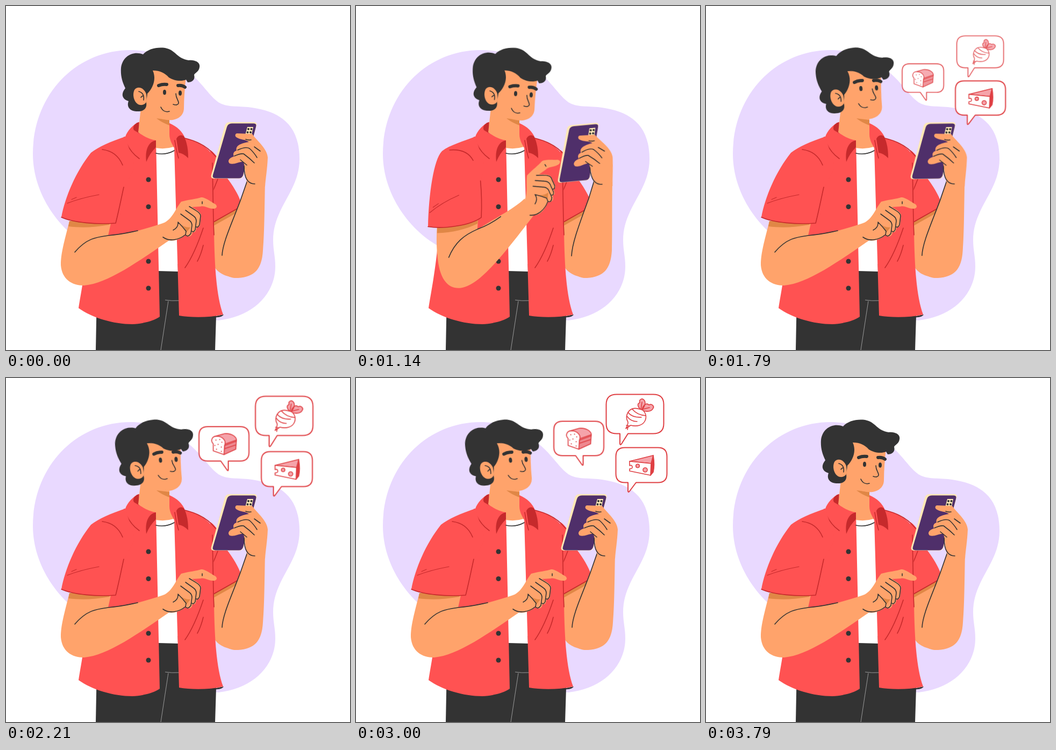
An HTML page without scripts that plays this animation: 640x640 px, repeating every 3.87 s.

```html
<!DOCTYPE html>
<html lang="en">
<head>
<meta charset="utf-8">
<title>Ordering groceries by phone</title>
<style>
html, body { margin: 0; width: 100%; height: 100%; overflow: hidden; background: #fff; }
svg { display: block; width: 100%; height: 100%; }
svg * { animation-duration: 3.87s; animation-iteration-count: infinite; animation-timing-function: ease-in-out; }

.skin { fill: #ffa36b; }
.shade { fill: #e08746; }
.shirt { fill: #ff5252; }
.fold { fill: #c62a2c; }
.dark { fill: #333; }
.ink, .seam { fill: none; stroke-width: 1.6; stroke-linecap: round; stroke-linejoin: round; }
.ink { stroke: #333; }
.seam { stroke: #c62a2c; }
.brow { fill: none; stroke: #333; stroke-width: 6; stroke-linecap: round; }

/* Limbs blend between a resting outline and a raised one */
.reach { d: var(--rest); animation-name: reach; }
@keyframes reach {
  0%, 11.11%, 42.38%, 100% { d: var(--rest); }
  18.35%, 27.65% { d: var(--up); }
}
.lean { d: var(--rest); animation-name: lean; }
@keyframes lean {
  0%, 11.11%, 50.39%, 100% { d: var(--rest); }
  18.35%, 35.5% { d: var(--up); }
}
.tap { transform-origin: 292px 430px; animation-name: tap; }
@keyframes tap {
  0%, 11.11%, 42.38%, 100% { transform: translate(0, 0) rotate(0deg); }
  18.35%, 27.65% { transform: translate(33px, -43px) rotate(-32.5deg); }
  27.65% { animation-timing-function: ease-in; }
  38.76% { transform: translate(8px, -2px) rotate(-13.7deg); animation-timing-function: ease-out; }
}
.tilt { transform-origin: 468px 385px; animation-name: tilt; }
@keyframes tilt {
  0%, 11.11%, 50.39%, 100% { transform: rotate(0deg); }
  18.35%, 35.5% { transform: rotate(-5.3deg); }
}
.head { transform-origin: 282px 227px; animation-name: head; }
@keyframes head {
  0%, 11.11%, 98%, 100% { transform: rotate(0deg); }
  18.35%, 25% { transform: rotate(3deg); }
  25% { animation-timing-function: ease-in; }
  38.76% { transform: rotate(-2.6deg); animation-timing-function: ease-out; }
  50.4%, 91.2% { transform: rotate(-5.9deg); }
}
.face { animation-name: face; }
@keyframes face {
  0%, 11.11%, 98%, 100% { transform: translateY(0); }
  18.35%, 25% { transform: translateY(3.5px); }
  25% { animation-timing-function: ease-in; }
  38.76% { transform: translateY(-3px); animation-timing-function: ease-out; }
  50.4%, 91.2% { transform: translateY(-6.7px); }
}

.bubble { stroke: #df3f43; stroke-width: 2; stroke-linejoin: round; fill: #fff; opacity: 0; }
.bubble g { stroke-width: 1.6; stroke-linecap: round; }
.pink { fill: #f5a3aa; }
.rose { fill: #ee8990; }
.red { fill: #df3f43; }
.line { fill: none; }

.cheese { animation-name: cheese; }
@keyframes cheese {
  0%, 33.3% { transform: translate(462px, 190px) scale(.05); opacity: 0; animation-timing-function: linear; }
  38.76% { transform: translate(494px, 173.5px) scale(.955); opacity: 1; animation-timing-function: ease-out; }
  57.11% { transform: translate(522.5px, 169.5px) scale(1); animation-timing-function: ease-out; }
  68.22% { transform: translate(532px, 163px) scale(1); }
  77.52% { transform: translate(531px, 162px) scale(1); animation-timing-function: ease-in; }
  90.44% { transform: translate(513px, 136.5px) scale(.89); opacity: 1; animation-timing-function: linear; }
  97.67%, 100% { transform: translate(516px, 100px) scale(.75); opacity: 0; }
}
.bread { animation-name: bread; }
@keyframes bread {
  0%, 36.9% { transform: translate(402px, 175px) scale(.02); opacity: 0; animation-timing-function: linear; }
  38.76% { transform: translate(402px, 169.5px) scale(.16); opacity: .55; animation-timing-function: ease-out; }
  51% { transform: translate(404px, 125px) scale(1); opacity: 1; }
  57.11% { transform: translate(405.5px, 122.5px) scale(1); animation-timing-function: ease-out; }
  70% { transform: translate(414px, 113px) scale(1); }
  77.52% { transform: translate(414.5px, 112.5px) scale(1); opacity: 1; animation-timing-function: ease-in; }
  90.44% { transform: translate(417px, 59.5px) scale(.975); opacity: .78; animation-timing-function: linear; }
  95.9%, 100% { transform: translate(420px, 30px) scale(.9); opacity: 0; }
}
.beet { animation-name: beet; }
@keyframes beet {
  0%, 37% { transform: translate(481px, 150px) scale(.03); opacity: 0; animation-timing-function: linear; }
  38.76% { transform: translate(483px, 142px) scale(.08); opacity: .45; animation-timing-function: ease-out; }
  51% { transform: translate(517px, 71px) scale(1); opacity: 1; }
  57.11% { transform: translate(517.5px, 70.5px) scale(1); animation-timing-function: ease-out; }
  70% { transform: translate(519px, 67px) scale(1); }
  77.52% { transform: translate(519px, 67px) scale(1); opacity: 1; animation-timing-function: ease-in; }
  90.44% { transform: translate(515.5px, 5px) scale(.92); opacity: .4; animation-timing-function: linear; }
  93.5%, 100% { transform: translate(515px, -18px) scale(.88); opacity: 0; }
}
.spark { opacity: 0; animation-name: spark; animation-timing-function: step-end; }
@keyframes spark {
  0%, 40.5% { opacity: 0; }
  38.5% { opacity: 1; }
}
</style>
</head>
<body>
<svg viewBox="0 0 640 640">
  <path fill="#e9d9ff" d="M232 82C130 82 50 165 50 275C50 350 100 420 160 450L300 570L395 585C460 578 501 535 501 485C501 465 497 455 497 435C497 375 546 345 546 285C546 220 510 195 450 188C425 186 410 188 395 179C370 160 360 130 310 102C285 88 260 82 232 82Z"/>

  <!-- Trousers and T-shirt -->
  <path class="dark" d="M168.500 560L167 640H389L391.500 560L322 480H280Z"/>
  <path fill="none" stroke="#999" d="M296 547Q308 549 322 548M302 549L288 640"/>
  <path fill="#fff" d="M277 255H313L320 494L283 493Z"/>

  <!-- Arm with the phone -->
  <path class="skin" d="M384 398L432 370L445 380L440 500C420 511 390 498 386 480Z"/>
  <path class="shade" d="M386 398L432 372L427 386L386 409Z"/>
  <path class="shirt" d="M380 268C392 276 400 290 409 317C423 335 431 349 437 364L442 366L430 377L386 402Z"/>
  <path class="seam" d="M432 376L386 402M394 322L386 342"/>
  <path class="skin lean" style="--rest:path('M449 322L436 362C420 405 404 440 400 470C398 508 425 506 432 506C462 504 476 490 478 455C481 420 481 370 482 328Z');--up:path('M444 320L433 358C418 400 403 440 399 470C398 508 425 506 430 506C460 504 474 490 476 455C477 420 476 370 477 328Z')"/>
  <path class="ink lean" style="--rest:path('M449 325L436 362C420 405 403 440 402 464');--up:path('M444 322L433 358C417 402 402 440 401 465')"/>

  <!-- Open shirt -->
  <path class="shirt" d="M248 216C236 220 226 232 222 243C200 252 178 260 165 271L153 430C150 480 140 530 135 562C160 580 200 592 235 592C255 591 275 586 286 578L279 250Z"/>
  <path class="dark" d="M385 578L405 574Q402 580 388 579Z"/>
  <path class="shirt" d="M304 218C318 224 329 234 333 246C358 252 376 263 386 280L387 420C388 480 391 540 404 574C378 580 345 580 322 576L313 264C306 256 303 246 303 238Z"/>
  <path class="seam" d="M333 246C358 252 378 264 390 280M384 292L386 405L387 426M367 413C358 440 345 470 333 487M367 445Q363 462 356 475"/>
  <g class="dark">
    <circle cx="265" cy="323" r="4.5"/><circle cx="265" cy="373.500" r="4.500"/>
    <circle cx="265" cy="424" r="4.500"/><circle cx="265" cy="475" r="4.500"/><circle cx="265" cy="525" r="4.500"/>
  </g>
  <path class="fold" d="M247 216C238 219 235 226 238 231L248 237Z"/>
  <path class="skin" d="M252 180L246 235Q262 247 279 250L278 264Q296 267 312 262Q304 250 304 238V195Z"/>
  <path class="shade" d="M280 209L304 212V222Q290 217 280 209Z"/>
  <path class="ink" d="M279 274Q297 278 313 269"/>
  <path class="fold" d="M279 250C266 252 258 266 261 290Q268 273 279 263ZM317 247C321 239 329 239 332 244C338 258 339 270 339 283Q330 274 321 273Z"/>
  <path class="seam" d="M220 244Q228 270 248 284M314 250Q317 270 321 283"/>

  <g class="head">
    <path class="skin" d="M262 110L335 130C333 150 331 170 331 190C331 206 316 214 300 212C282 209 262 203 252 188L250 150Z"/>
    <g class="face">
      <path class="brow" d="M284 148Q291 145 299 146M320 148Q328 147 333 151"/>
      <ellipse class="dark" cx="295" cy="160.500" rx="3" ry="4.700"/>
      <ellipse class="dark" cx="324" cy="162" rx="3" ry="4.700"/>
      <path class="ink" d="M316 163C316 173 322 176 321 181C320 184 316 185 311 183M288 188C291 195 297 198 304 196"/>
    </g>
    <path class="dark" d="M255 90C264 80 280 76 296 78C316 82 318 98 340 101C352 100 362 105 360 114C359 122 352 124 350 128C352 136 348 142 338 142L335 137C326 141 312 139 303 133C295 124 286 120 273 120C280 135 274 152 263 163L261 180C263 192 254 197 242 196C230 195 224 187 228 177C216 173 213 164 222 153C216 140 213 130 214 115C217 92 238 83 255 90Z"/>
    <path class="skin" d="M261 164C257 152 245 148 239 156C234 166 239 182 249 184C256 185 261 181 262 176Z"/>
    <path class="ink" d="M247 159Q258 162 256 175M251 170Q253 167 256 167"/>
  </g>

  <!-- Tapping arm -->
  <path class="skin reach" style="--rest:path('M118 400C108 440 102 460 102 482C104 508 122 520 145 520C190 516 245 476 308 433L298 402C260 415 225 425 190 427L196 400Z');--up:path('M152 408C150 440 152 460 155 480C160 508 172 525 192 525C225 524 262 480 332 387L314 357C290 380 255 395 227 416L228 396Z')"/>
  <path class="shade reach" style="--rest:path('M118 400L116 410C140 413 165 412 192 407L196 400Z');--up:path('M152 410L152 423C180 422 205 416 227 405L228 396Z')"/>
  <g class="tap">
    <path class="skin" d="M293 404C310 396 314 379 326 364C340 360 355 359 363 356C369 355 378 362 390 369C395 374 390 378 384 377C376 377 370 371 362 373L346 374C356 380 363 384 363 390L361 408C359 413 355 411 354 414C353 422 350 421 347 421C346 430 338 431 334 426C326 433 312 439 302 436L292 430Z"/>
    <path class="shade" d="M319 402Q330 412 343 412L336 421Q330 409 319 402Z"/>
    <path class="ink" d="M341 373C352 380 362 384 362 391L360 407Q357 413 354 411M334 380L348 390Q354 394 354 400L352 416Q349 422 346 419M325 387L340 398Q346 402 346 408L344 423Q339 431 334 426M311 417Q321 412 320 402Q329 411 335 419L334 426M292 430C304 439 322 435 333 426M365 364L365 368"/>
  </g>
  <path class="ink reach" style="--rest:path('M128 458C150 432 168 430 190 427C215 425 230 421 245 418');--up:path('M174 468C185 440 202 426 227 415C245 408 258 400 270 391')"/>
  <path class="shirt reach" style="--rest:path('M222 243C195 252 172 262 158 273C130 308 110 355 103 393C125 403 170 407 204 404C212 380 216 355 220 337L240 300Z');--up:path('M222 243C200 252 175 258 160 270C145 285 136 350 135 411C165 416 215 408 234 393C235 370 234 345 232 325L240 300Z')"/>
  <path class="seam reach" style="--rest:path('M103 393C125 403 170 407 204 404C209 385 214 360 219 337');--up:path('M135 411C165 416 215 408 234 393C235 370 234 345 232 325')"/>
  <path class="seam reach" style="stroke-width:1.2;--rest:path('M114 367Q140 357 173 351M122 360L131 356');--up:path('M138 385Q160 366 192 352M144 375L154 368')"/>
  <path class="seam reach" style="--rest:path('M179 267Q206 270 217 296');--up:path('M174 268Q206 265 218 287')"/>

  <!-- Phone and the hand around it -->
  <g class="tilt">
    <path fill="#ffe8b5" d="M416 216H461Q468 216 466 223L442 315Q440 321 434 321H387Q380 321 382 314L407 223Q409 216 416 216Z"/>
    <path fill="#4f2f6a" d="M420 218.500H461Q467 218.500 465 225L441 315Q439 320.500 433 320.500H390Q383 320.500 385 314L411 225Q413 218.500 420 218.500Z"/>
    <path fill="#ffe8b5" d="M449 225H460L456 244H444Z"/>
    <g class="dark"><circle cx="451" cy="229" r="2"/><circle cx="456.500" cy="229" r="2"/><circle cx="449.500" cy="235" r="2"/><circle cx="455" cy="235" r="2"/></g>
    <path class="skin" d="M430 237L458 238C467 251 486 265 487 282C486 305 483 320 482 336L451 332C444 322 446 305 442 290C436 288 425 296 416 293C411 288 416 282 424 280C422 275 423 271 429 269C427 262 432 256 452 253C446 248 436 249 430 245C425 243 426 237 430 237Z"/>
    <path class="ink" d="M443 298C443 318 448 331 463 331M456 249Q450 250 446 248M462 262L473 270M431 268Q446 261 453 265Q461 272 467 282M425 279Q436 274 442 275Q453 283 462 292M436 286L448 296"/>
  </g>

  <!-- Speech bubbles -->
  <ellipse class="red spark" cx="442" cy="149" rx="1.500" ry="3"/>
  <g class="bubble beet">
    <path d="M-34 -36.500H34Q53.500 -36.500 53.500 -18V18Q53.500 36.500 34 36.500H-13L-25 55.500Q-28 59 -28 55V36.500H-34Q-53.500 36.500 -53.500 18V-18Q-53.500 -36.500 -34 -36.500Z"/>
    <g>
      <path class="pink" d="M11 -8C3 -15 5 -20 9 -21C7 -28 14 -30 17 -26C21 -21 18 -13 13 -8C15 -16 21 -22 26 -17C32 -20 36 -14 34 -11C31 -4 20 -3 11 -8Z"/>
      <path class="line" d="M11 -8L13 -22M11 -8L27 -12"/>
      <path d="M9 -9C18 -8 23 3 19 12C15 21 4 24 -8 21L-17 27C-14 22 -13 18 -13 15C-17 8 -16 2 -13 -3C-8 -11 0 -12 9 -9Z"/>
      <path class="line" d="M-13 -3Q-5 7 12 6M-15 4Q-8 14 4 14M-5 -9Q4 2 20 3M-11 22L-16 21M-13 24L-14 29"/>
    </g>
  </g>
  <g class="bubble bread">
    <path d="M-30 -32H30Q46.500 -32 46.500 -16V16Q46.500 32 30 32H8V48Q8 51 6 49L-6 32H-30Q-46.500 32 -46.500 16V-16Q-46.500 -32 -30 -32Z"/>
    <g>
      <path class="rose" d="M1 3L23 -6L22 10L0 20Z"/>
      <path class="pink" d="M-17 -14L1 -19C14 -20 25 -13 23 -5L1 3C4 -5 -4 -14 -17 -14Z"/>
      <path class="line" d="M3 0L23 -7M1 9L22 2"/>
      <path d="M-20 13V0C-26 -6 -22 -15 -13 -14C-2 -14 5 -5 1 3L0 20Z"/>
      <path class="line" stroke-width="2" d="M-15 -7h.1M-8 -8h.1M-17 3h.1M-11 1h.1M-4 -3h.1M-14 10h.1M-5 6h.1M-5 14h.1"/>
    </g>
  </g>
  <g class="bubble cheese">
    <path d="M-31 -32.500H31Q47.500 -32.500 47.500 -16V16Q47.500 32.500 31 32.500H-10L-22 48.500Q-25 52 -25 48V32.500H-31Q-47.500 32.500 -47.500 16V-16Q-47.500 -32.500 -31 -32.500Z"/>
    <g>
      <path class="red" d="M22 -18Q25 0 22 13L17 19L18 -4Z"/>
      <path class="pink" d="M-22 -7L22 -18L18 -3Z"/>
      <path d="M-22 -7L18 -3L17 19L-22 11V7Q-16 7 -17 3Q-18 -1 -22 1Z"/>
      <circle class="pink" cx="-7" cy="1.500" r="3.300"/>
      <circle class="pink" cx="7" cy="9" r="4"/>
    </g>
  </g>
</svg>
</body>
</html>
```
